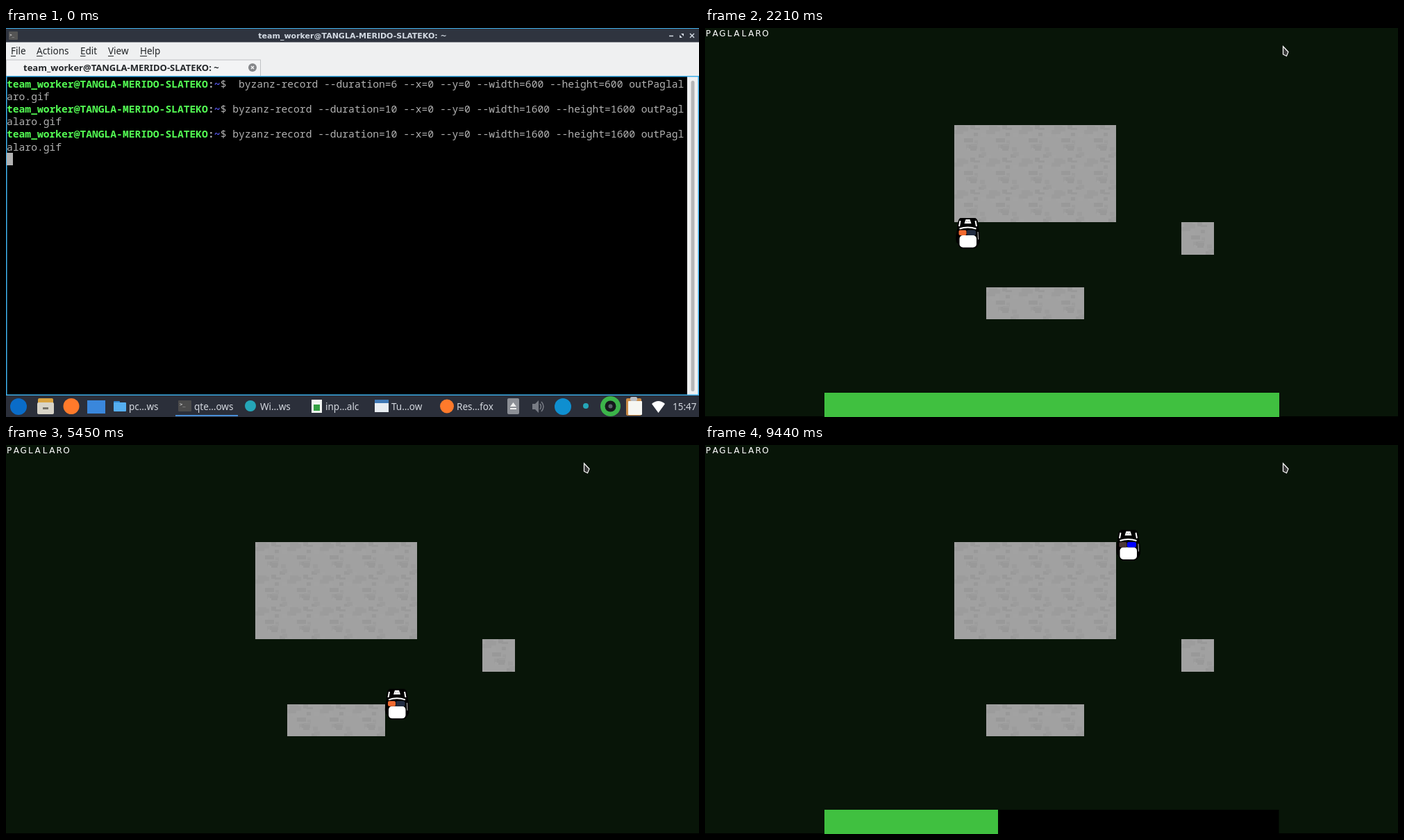
Write an HTML page with a canvas that moves like this. It is 998 px wide and 561 px high and loops after 9.46 s.

```html
<!DOCTYPE html>
<html lang="en">
<head>
<meta charset="utf-8">
<title>Paglalaro</title>
<style>
html, body { margin: 0; width: 100%; height: 100%; overflow: hidden; background: #081508; }
canvas { display: block; }
</style>
</head>
<body>
<canvas id="stage" width="998" height="561"></canvas>
<script>
const c = document.getElementById('stage').getContext('2d');
const LOOP = 9460, STEP = 94.8, TILE = 46.75, LEFT = 172;
const SANS = '"Noto Sans", "Open Sans", sans-serif';
const MONO = '14.65px "Noto Sans Mono", "DejaVu Sans Mono", monospace';
const USER = 'team_worker@TANGLA-MERIDO-SLATEKO';

function rect(x, y, w, h, color, r = 0) {
  c.fillStyle = color;
  c.beginPath();
  c.roundRect(x, y, w, h, r);
  c.fill();
}
function disc(x, y, r, color) {
  rect(x - r, y - r, 2 * r, 2 * r, color, r);
}
function shape(path, fill, stroke, width = 1) {
  const p = new Path2D(path);
  if (fill) { c.fillStyle = fill; c.fill(p); }
  if (stroke) { c.strokeStyle = stroke; c.lineWidth = width; c.stroke(p); }
}
function text(str, x, y, color, font, align = 'left') {
  c.font = font;
  c.fillStyle = color;
  c.textAlign = align;
  c.fillText(str, x, y);
}

// ---- terminal and desktop panel ----

function command(row, cmd) {
  const pitch = 8.79, columns = 111, y = 85.5 + row * 18.2;
  const put = (s, col, color, weight = '') => text(s, 1 + col * pitch, y, color, weight + MONO);
  const head = USER.length, room = columns - head - 3;
  put(USER, 0, '#54ff54', 'bold ');
  put(':', head, '#b2b2b2', 'bold ');
  put('~', head + 1, '#5c5cff', 'bold ');
  put('$' + cmd.slice(0, room), head + 2, '#b2b2b2');
  text(cmd.slice(room), 1, y + 18.2, '#b2b2b2', MONO);
}

function panel() {
  rect(0, 530, 998, 31, '#2b2f3a');
  const labels = { 'pc…ws': 177, 'qte…ows': 271, 'Wi…ws': 366, 'inp…alc': 460, 'Tu…ow': 555, 'Res…fox': 649, '15:47': 960 };
  for (const s in labels) text(s, labels[s], 550.5, '#d3d7de', '13.5px ' + SANS);
  disc(18, 546, 12, '#0a6cc8');
  rect(46, 534, 22, 12, '#d9a441', 2);
  rect(45, 540, 24, 17, '#d8d4c8', 2);
  rect(53, 547, 8, 3, '#77736a');
  disc(94, 545.5, 11.5, '#ff7a2b');
  rect(117, 537, 26, 19, '#3a87dc');
  rect(155, 538, 9, 6, '#2f86cf', 1);
  rect(155, 540, 18, 13, '#55aef0', 1);
  rect(244, 558, 90, 2, '#4a90d9');
  rect(248, 537, 19, 16, '#4b4b4b', 1);
  text('>_', 250, 545, '#eee', '7px "DejaVu Sans Mono", monospace');
  disc(352, 545, 8, '#25a6b8');
  rect(440, 536, 15, 19, '#f2f5f2');
  rect(443, 543, 9, 9, '#34a043');
  rect(531, 536, 20, 18, '#e8edf2');
  rect(531, 536, 20, 5, '#3f78b5');
  disc(635, 545.5, 10, '#ff7a2b');
  rect(722, 534, 17, 23, '#8c8f96', 2);
  shape('M726 546h9l-4.5-6zM726 548h9v2h-9z', '#eee');
  shape('M758 542h4l5-5v18l-5-5h-4z', '#777b84');
  shape('M769 542q3 4 0 8M771 539q6 7 0 14', null, '#777b84', 1.5);
  disc(802, 546, 12, '#0f8fd0');
  disc(835, 545, 4, '#25a6b8');
  disc(870.5, 545.5, 14.5, '#3cb54a');
  disc(870.5, 545.5, 8, '#15191c');
  disc(870.5, 545.5, 3, '#59636a');
  rect(893, 534, 22, 25, '#c98a45', 2);
  rect(896, 538, 20, 20, '#f6f6f2', 1);
  rect(899, 532, 10, 6, '#b8bcc2', 2);
  shape('M939.5 555L930 542q9.5-8 19 0z', '#fff');
}

function terminal() {
  rect(0, 0, 998, 561, '#eff0f1');
  rect(0, 0, 998, 20.5, '#2f343f');
  rect(0, 0, 998, 1, '#3daee9');
  rect(4, 5, 13, 12, '#555', 1);
  text('>_', 5, 12, '#fff', '6px "DejaVu Sans Mono", monospace');
  text(USER + ': ~', 499, 15, '#d3dae3', 'bold 11px "DejaVu Sans", sans-serif', 'center');
  shape('M955 11.5h6M985 8l6 6M991 8l-6 6', null, '#d3dae3', 1.5);
  shape('M970 14v-4l4 4zM972 8h4v4z', '#d3dae3');

  const menu = { File: 7, Actions: 44, Edit: 107, View: 147, Help: 193 };
  for (const s in menu) {
    text(s, menu[s], 38, '#232629', '13.5px ' + SANS);
    rect(menu[s], 40, c.measureText(s[0]).width, 1, '#232629');
  }
  rect(0, 45.5, 367, 24, '#bfc1c3');
  rect(1, 46.5, 365, 23, '#f3f4f5');
  text(USER + ': ~', 25, 62, '#232629', 'bold 13px ' + SANS);
  disc(355, 57, 6, '#85878a');
  shape('M353 55l4 4M357 55l-4 4', null, '#fff', 1.2);

  rect(0, 69, 998, 461, '#3daee9');
  rect(1.5, 70.5, 979.5, 458, '#000');
  rect(981, 70.5, 15.5, 458, '#eff0f1');
  rect(986.5, 76, 5, 448, '#b4b6b8', 2.5);
  [[' ', 6, 600], ['', 10, 1600], ['', 10, 1600]].forEach(([gap, secs, size], i) => command(2 * i,
    ` ${gap}byzanz-record --duration=${secs} --x=0 --y=0 --width=${size} --height=${size} outPaglalaro.gif`));
  rect(1, 180, 9, 18, '#b2b2b2');
  panel();
}

// ---- game ----

// legs driven at one speed: earliest departure, then the place to reach
const SPEED = 0.15;
const legs = [
  [440, 345, 198], [940, 345, 318], [0, 378.5, 318], [0, 378.5, 296],
  [2230, 481, 296], [0, 481, 358], [4130, 592, 358], [0, 592, 388],
  [0, 563, 388], [5350, 563, 366], [0, 657, 314], [0, 657, 306],
  [6305, 669.5, 306], [6650, 669.5, 255], [7108, 732, 255], [7600, 732, 196],
  [0, 609.5, 196], [9080, 609.5, 144.5]
];

function pose(t) {
  let x = 270, y = 198, turn = 1, free = 0;
  for (const [leave, tx, ty] of legs) {
    const start = Math.max(leave, free);
    if (t < start) break;
    const dx = tx - x, dy = ty - y, time = Math.hypot(dx, dy) / SPEED;
    const k = Math.min(1, (t - start) / time);
    turn = Math.abs(dx) > Math.abs(dy) ? (dx > 0 ? 1 : 3) : (dy > 0 ? 2 : 0);
    x += dx * k;
    y += dy * k;
    free = start + time;
    if (k < 1) break;
  }
  return [x, y, turn];
}

function makeStone() {
  const tile = document.createElement('canvas'), g = tile.getContext('2d');
  let seed = 11;
  const rnd = m => (seed = seed * 16807 % 2147483647) % m;
  tile.width = tile.height = 47;
  g.fillStyle = '#a1a1a1';
  g.fillRect(0, 0, 47, 47);
  for (let i = 0; i < 22; i++) {
    g.fillStyle = ['#9c9c9c', '#999', '#a2a2a2'][i % 3];
    g.fillRect(rnd(40), rnd(44), 5 + rnd(9), 3 + rnd(5));
  }
  return tile;
}
const stone = makeStone();

function wall(col, row, cols, rows) {
  const px = i => Math.floor(LEFT + i * TILE), py = j => Math.floor(j * TILE);
  c.save();
  c.beginPath();
  c.rect(px(col), py(row), px(col + cols) - px(col), py(row + rows) - py(row));
  c.clip();
  for (let i = col; i < col + cols; i++)
    for (let j = row; j < row + rows; j++) c.drawImage(stone, px(i), py(j));
  c.restore();
}

function car(x, y, turn, red) {
  c.save();
  c.translate(x, y);
  c.rotate(turn * Math.PI / 2);
  shape('M-11-22H11Q15-20 15-12Q18 0 17.5 12Q14 22 8 22H-8Q-13 21-14 15Q-18 14-17 3Q-15-6-14.5-14Q-14-20-11-22Z', '#000');
  rect(-12, 3, 24.5, 17.5, '#fff', 5);
  rect(-13, -4.5, 11, 7.5, red ? '#f26a30' : '#4a3535', 2);
  rect(-1.5, -4.5, 13, 7.5, red ? '#222c42' : '#00f', 2);
  shape('M-12-6.5Q0-10.5 12-6.5M-11-18l-1.5 8M11-18l1.5 8', null, '#fff', 2);
  shape('M14.5-2l.5 11', null, '#ccc');
  shape('M-3-20H3L5-14H-5Z', '#fff');
  shape('M-2-17h1M1-17h1', null, '#333');
  c.restore();
}

// an empty bar appears, then fills up in green
function gauge(t) {
  const bar = (w, color) => rect(LEFT, 526, w, 35, color);
  const runs = [[410, 1274, 2400], [3440, 4400, 4400], [8150, 9066, LOOP]];
  const run = runs.find(([from, , to]) => t >= from && t < to);
  if (!run) return;
  const filling = t >= run[1], full = 14 * TILE;
  bar(filling ? full : 438, '#000');
  if (filling) bar(Math.round(full * Math.min(1, (t - run[1]) * 0.00106)), '#40c040');
}

function game(t) {
  rect(0, 0, 998, 561, '#081508');
  rect(0, 560, 998, 1, '#000');
  [...'PAGLALARO'].forEach((s, i) =>
    text(s, 4.5 + i * 10.3, 12, '#fff', '12px "DejaVu Sans", sans-serif', 'center'));
  wall(4, 3, 5, 3);
  wall(11, 6, 1, 1);
  wall(5, 8, 3, 1);
  gauge(t);
  car(...pose(t), (t + 100) % 540 < 270);
  shape('M832.5 26.5l7.5 8l-2.5 6l-5-2.5z', '#3a3a3a', '#fff', 1.2);
}

function draw(now) {
  const t = now % LOOP;
  if (t < 130) terminal();
  else game(t < 400 ? 230 : 420 + Math.floor((t - 400) / STEP) * STEP);
  requestAnimationFrame(draw);
}
draw(0);
</script>
</body>
</html>
```
